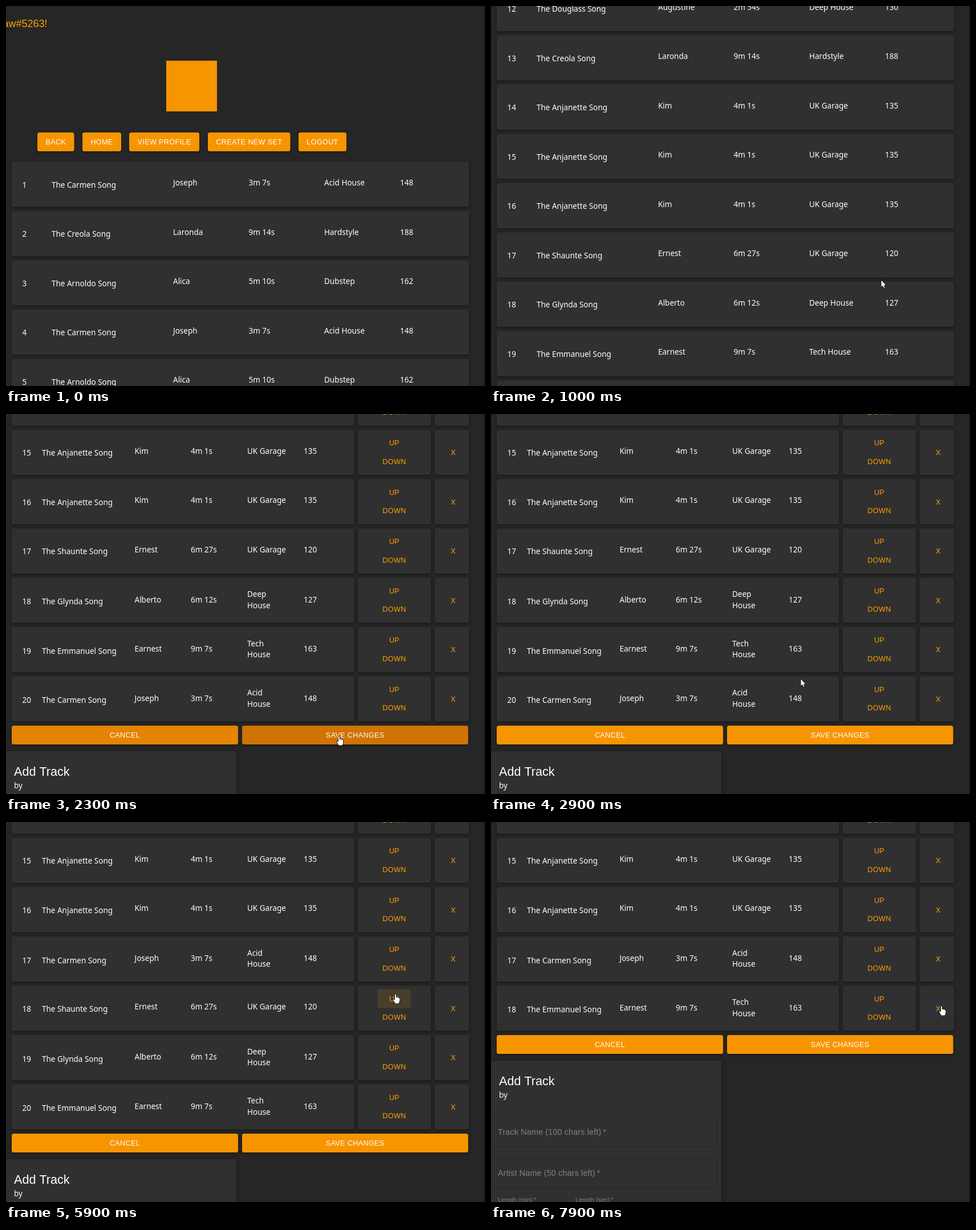
Write an HTML page with a canvas that moves like this. It is 840 px wide and 667 px high and loops after 8000 ms.

```html
<!DOCTYPE html>
<html lang="en">
<head>
<meta charset="utf-8">
<title>Set editor</title>
<style>
html, body { margin: 0; width: 100%; height: 100%; overflow: hidden; background: #262626; }
canvas { display: block; width: 840px; height: 667px; }
</style>
</head>
<body>
<canvas id="stage" width="840" height="667"></canvas>
<script>
const ctx = document.getElementById('stage').getContext('2d');
const LOOP = 8000, STEP = 100;
const ROW_TOP = 273.5, PITCH = 86.5, ROW_H = 79, END_SCROLL = 1456.5;
const EDIT_AT = 2100;
const PAGE = '#262626', CARD = '#303030', ORANGE = '#f79500', DARK_ORANGE = '#d17300';
const BODY = '13.5px "Noto Sans", "Open Sans", sans-serif';
const arial = size => size + 'px "Liberation Sans", Arial, sans-serif';

const song = (name, artist, time, genre, bpm) => ({ title: `The ${name} Song`, artist, time, genre, bpm });
const carmen = song('Carmen', 'Joseph', '3m 7s', 'Acid House', 148);
const creola = song('Creola', 'Laronda', '9m 14s', 'Hardstyle', 188);
const arnoldo = song('Arnoldo', 'Alica', '5m 10s', 'Dubstep', 162);
const erasmo = song('Erasmo', 'Fanny', '7m 5s', 'Tech House', 153);
const chang = song('Chang', 'Jere', '6m 51s', 'Hardstyle', 100);
const laronda = song('Laronda', 'Denisse', '6m 17s', 'Hardstyle', 140);
const willy = song('Willy', 'Lauralee', '4m 34s', 'Happy Hardcore', 195);
const douglass = song('Douglass', 'Augustine', '2m 54s', 'Deep House', 130);
const anjanette = song('Anjanette', 'Kim', '4m 1s', 'UK Garage', 135);
const shaunte = song('Shaunte', 'Ernest', '6m 27s', 'UK Garage', 120);
const glynda = song('Glynda', 'Alberto', '6m 12s', 'Deep House', 127);
const emmanuel = song('Emmanuel', 'Earnest', '9m 7s', 'Tech House', 163);
const SET = [carmen, creola, arnoldo, carmen, arnoldo, erasmo, chang, laronda, willy, douglass,
  anjanette, douglass, creola, anjanette, anjanette, anjanette, shaunte, glynda, emmanuel, carmen];

// Clicks on row buttons: time, action, row index
const CLICKS = [
  [3800, 'up', 19], [4600, 'up', 18], [5700, 'up', 17],
  [6700, 'x', 17], [7300, 'x', 17]
];

const SCROLL = [[300, 0], [400, 60], [500, 200], [600, 370], [700, 540], [1000, 1260], [1100, END_SCROLL]];

// Pointer path: time, x, y, hand shape
const POINTER = [
  [100, 793, 197, 0], [200, 684, 481, 0], [1400, 684, 481, 0], [1600, 612, 562, 1],
  [1700, 590, 578, 0], [1900, 584, 565, 1], [2300, 584, 565, 1], [2500, 575, 552, 1],
  [2600, 565, 525, 0], [2900, 543, 465, 0], [3200, 543, 465, 0], [3500, 682, 486, 1],
  [4100, 682, 486, 1], [4500, 675, 394, 1], [5000, 675, 394, 1], [5300, 683, 302, 1],
  [5900, 683, 302, 1], [6000, 692, 298, 1], [6100, 715, 284, 0], [6200, 745, 291, 0],
  [6300, 775, 313, 1], [6400, 788, 322, 1], [7800, 788, 322, 1], [7900, 790, 323, 1]
];

function sample(keys, t, col) {
  if (t <= keys[0][0]) return keys[0][col];
  for (let i = 1; i < keys.length; i++) {
    const a = keys[i - 1], b = keys[i];
    if (t <= b[0]) return a[col] + (b[col] - a[col]) * (t - a[0]) / (b[0] - a[0]);
  }
  return keys[keys.length - 1][col];
}

function pointerAt(t) {
  if (t < POINTER[0][0]) return null;
  const hand = POINTER.filter(k => k[0] <= t).pop()[3];
  return { x: Math.round(sample(POINTER, t, 1)), y: Math.round(sample(POINTER, t, 2)), hand };
}

function songsAt(t) {
  const list = SET.slice();
  for (const [at, action, i] of CLICKS) {
    if (t < at + 100) continue;
    if (action === 'up') [list[i - 1], list[i]] = [list[i], list[i - 1]];
    else list.splice(i, 1);
  }
  return list;
}

function text(str, x, y, font, color = '#fff', align = 'left', spacing = 0) {
  ctx.font = font;
  ctx.fillStyle = color;
  ctx.textAlign = align;
  ctx.letterSpacing = spacing + 'px';
  ctx.fillText(str, x, Math.round(y));
}

const caption = (str, x, y, color) => text(str, x, y, arial(12.6), color, 'center', 0.36);

function box(x, y, w, h, color, r = 3.6) {
  ctx.fillStyle = color;
  ctx.beginPath();
  ctx.roundRect(x, y, w, h, r);
  ctx.fill();
}

function raised(x, y, w, h, color, blur = 4) {
  ctx.save();
  ctx.shadowColor = 'rgba(0,0,0,.4)';
  ctx.shadowBlur = blur;
  ctx.shadowOffsetY = 1.5;
  box(x, y, w, h, color);
  ctx.restore();
}

function button(label, x, y, w, color = ORANGE) {
  raised(x, y, w, 33, color);
  caption(label, x + w / 2, y + 20.5, '#fff');
}

function mix(k) {
  const a = [247, 149, 0], b = [209, 115, 0];
  return `rgb(${a.map((v, i) => Math.round(v + (b[i] - v) * k))})`;
}

function flatButton(label, x, y, w, cx, ptr, ripple) {
  const over = ptr && ptr.x >= x && ptr.x < x + w && ptr.y >= y && ptr.y < y + 33;
  if (over) box(x, y, w, 33, ripple ? '#493e2b' : '#2e3337');
  caption(label, cx, y + 21, '#ffa000');
}

function row(s, i, y, edit, ptr, ripple) {
  const cols = edit ? [63, 225.5, 324, 423, 522] : [80, 293, 425.5, 558, 691];
  const wrap = s.genre === 'Happy Hardcore' || edit && / House$/.test(s.genre);
  const base = y + (wrap ? 46.5 : 45), sub = y + (wrap ? 43 : 41.5);
  raised(10, y, edit ? 600 : 802, ROW_H, CARD);
  text(i + 1, 28.5, base, BODY);
  text(s.title, cols[0], base, BODY);
  text(s.artist, cols[1], sub, BODY);
  text(s.time, cols[2], sub, BODY);
  if (wrap) s.genre.split(' ').forEach((w, n) => text(w, cols[3], y + 33.5 + n * 19.5, BODY));
  else text(s.genre, cols[3], sub, BODY);
  text(s.bpm, cols[4], sub, BODY);
  if (!edit) return;
  raised(617, y, 128, ROW_H, CARD);
  raised(752, y, 60, ROW_H, CARD);
  flatButton('UP', 652, y + 6, 57.5, 681, ptr, ripple);
  flatButton('DOWN', 646, y + 38.5, 70, 681, ptr, ripple);
  flatButton('X', 756, y + 23, 56, 784.5, ptr, ripple);
}

function header(top) {
  text('aw#5263!', 72.5, top + 37, arial(18), '#ffa000', 'right');
  ctx.fillStyle = ORANGE;
  ctx.fillRect(281, top + 96, 89, 89);
  [['BACK', 55, 64.5], ['HOME', 134, 68], ['VIEW PROFILE', 216, 123],
   ['CREATE NEW SET', 354, 144.5], ['LOGOUT', 513, 84]]
    .forEach(([label, x, w]) => button(label, x, top + 222, w));
}

function field(label, y) {
  ctx.strokeStyle = '#262626';
  ctx.lineWidth = 1;
  ctx.beginPath();
  ctx.roundRect(-3.5, Math.round(y) + 0.5, 400, 50, 3.6);
  ctx.stroke();
  text(label + '\u2009*', 12, y + 30, arial(14.4), '#808080', 'left', 0.135);
}

function form(y) {
  raised(-10, y, 414, 420, CARD, 8);
  text('Add Track', 14, y + 42.5, arial(21.6));
  text('by', 14, y + 65, BODY);
  field('Track Name (100 chars left)', y + 100);
  field('Artist Name (50 chars left)', y + 172);
  text('Length (min)\u2009*', 12, y + 248, arial(10.8), '#808080');
  text('Length (sec)\u2009*', 148, y + 248, arial(10.8), '#808080');
}

function shape(points, x, y) {
  ctx.beginPath();
  points.forEach(([px, py]) => ctx.lineTo(x + px, y + py));
  ctx.closePath();
  ctx.lineJoin = 'round';
  ctx.lineWidth = 1.6;
  ctx.strokeStyle = '#000';
  ctx.stroke();
  ctx.fillStyle = '#fff';
  ctx.fill();
}

const ARROW = [[0.5, 0.5], [0.5, 12], [3, 9.8], [4.8, 13.8], [6.6, 13], [4.9, 9], [8.4, 8.8]];
const HAND = [[-1, 1], [0, 0], [1, 1], [1, 6], [3, 5.5], [4, 6.5], [5.5, 6.3], [7, 7.5], [7.5, 9],
  [7, 13], [5.8, 16.5], [-0.5, 16.5], [-2, 13.5], [-4, 10.5], [-3.4, 9], [-1, 10.5]];

function draw(t) {
  const edit = t >= EDIT_AT;
  const top = -sample(SCROLL, t, 1);
  const ptr = pointerAt(t);
  const songs = songsAt(t);
  const ripple = CLICKS.some(([at]) => t >= at + 100 && t < at + 300);

  ctx.fillStyle = PAGE;
  ctx.fillRect(0, 0, 840, 667);
  ctx.fillStyle = '#1d1d1d';
  ctx.fillRect(0, top, 840, 1);
  ctx.fillRect(838, 0, 2, 667);

  if (top > -300) header(top);
  songs.forEach((s, i) => {
    const y = top + ROW_TOP + i * PITCH;
    if (y > -ROW_H - 10 && y < 680) row(s, i, y, edit, ptr, ripple);
  });

  const end = top + ROW_TOP + songs.length * PITCH;
  if (edit) {
    const fade = Math.max(0, 1 - (t - EDIT_AT) / 400);
    const hover = Math.min(1, Math.max(0, (2800 - t) / 250));
    button('CANCEL', 10, end, 397, mix(fade));
    button('SAVE CHANGES', 414, end, 396.5, mix(hover));
    form(end + 45);
  } else if (end < 690) {
    button('EDIT', 7, end - 3, 808.5, t >= 1600 ? DARK_ORANGE : ORANGE);
    button('DELETE SET', 7, end + 51.5, 808.5, '#d32f2f');
  }

  if (ptr) shape(ptr.hand ? HAND : ARROW, ptr.x, ptr.y);
}

function tick(now) {
  draw(Math.floor(now % LOOP / STEP) * STEP);
  requestAnimationFrame(tick);
}
draw(0);
requestAnimationFrame(tick);
</script>
</body>
</html>
```
